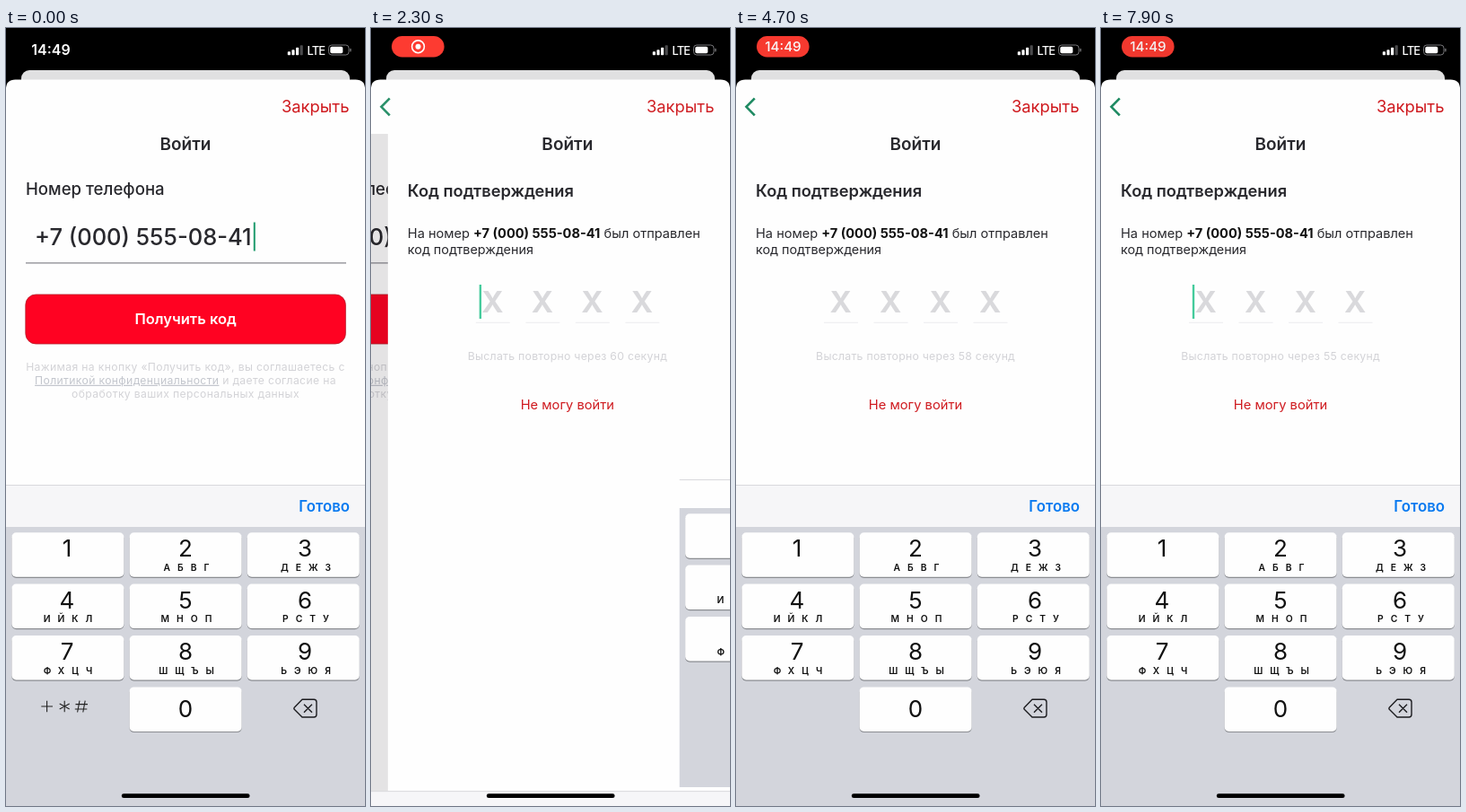
Recreate the animation shown at these times as an HTML page. Size 400 px wide and 867 px high, loop 8000 ms.

```html
<!DOCTYPE html>
<html lang="ru">
<head>
<meta charset="utf-8">
<title>Вход по коду</title>
<style>
  html, body { margin: 0; width: 100%; height: 100%; overflow: hidden; background: #000; }
  svg { display: block; width: 400px; height: 867px; font-family: Inter, "Open Sans", sans-serif; }
</style>
</head>
<body>
<svg id="stage" viewBox="0 0 400 867"></svg>
<script>
const LOOP = 8000;
const PHONE = '+7 (000) 555-08-41';
const RED = '#cf1a1f', INK = '#28282d', PALE = '#d3d3d7', PAPER = '#fefefe';

const rect = (x, y, w, h, fill, r = 0, extra = '') =>
  `<rect x="${x}" y="${y}" width="${w}" height="${h}" rx="${r}" fill="${fill}" ${extra}/>`;
const text = (s, x, y, size, fill, weight = 400, anchor = 'start', extra = '') =>
  `<text x="${x}" y="${y}" font-size="${size}" fill="${fill}" font-weight="${weight}" text-anchor="${anchor}" ${extra}>${s}</text>`;
const line = (d, color, width, extra = '') =>
  `<path d="${d}" fill="none" stroke="${color}" stroke-width="${width}" ${extra}/>`;
const group = (id, body) => `<g id="${id}">${body}</g>`;

function statusBar() {
  const bars = [4, 6, 8.5, 11].map((h, i) =>
    rect(313.8 + i * 4.6, 30.3 - h, 3.2, h, i < 3 ? '#fff' : '#4a4a4c', 0.8)).join('');
  const battery = rect(359.5, 19, 22.5, 11, 'none', 3.4, 'stroke="#77777a"') +
    rect(361.3, 20.8, 14, 7.4, '#fff', 1.8) + rect(383.2, 22.7, 1.4, 3.8, '#77777a', 0.7);
  const record = '<circle cx="52.5" cy="20.8" r="6.9" fill="none" stroke="#fff" stroke-width="1.6"/>' +
    '<circle cx="52.5" cy="20.8" r="3" fill="#fff"/>';
  return text('14:49', 50, 30, 16, '#fff', 600, 'middle', 'id="clock"') +
    group('pill', rect(23, 9, 58.6, 23.4, '#fd3b31', 11.7) + group('record', record) +
      text('14:49', 52.5, 26.2, 15.2, '#fff', 500, 'middle', 'id="pillClock"')) +
    bars + text('LTE', 335.5, 30, 13, '#fff', 500, 'start', 'letter-spacing="-.9"') + battery;
}

function phonePage() {
  const terms = (s, y) => text(s, 200, y, 12.2, PALE, 400, 'middle', 'letter-spacing=".35"');
  return rect(0, 118, 400, 749, PAPER) +
    text('Войти', 200, 135.5, 19, INK, 600, 'middle') +
    text('Номер телефона', 22, 186, 18.6, INK, 500) +
    text(PHONE, 32, 242.3, 25.5, INK, 500) +
    rect(22, 261.3, 357, 1.2, '#84848b') +
    rect(275.8, 216.5, 2, 32, '#1d9a6c', 0, 'id="phoneCaret"') +
    rect(21.8, 297, 356.6, 55, '#ff0222', 11.5, 'stroke="#b3202c" stroke-width=".8"') +
    text('Получить код', 200, 330.3, 16.5, '#fff', 600, 'middle') +
    terms('Нажимая на кнопку «Получить код», вы соглашаетесь с', 381.5) +
    terms('<tspan fill="#c3c6cd" text-decoration="underline">Политикой конфиденциальности</tspan> и даете согласие на', 396.8) +
    terms('обработку ваших персональных данных', 412) +
    rect(0, 118, 400, 749, '#0a0010', 0, 'id="dim"');
}

function codePage() {
  const cells = [0, 1, 2, 3].map(i =>
    text('X', 116.6 + i * 55.5, 317.3, 33, '#d9d9dc', 700, 'middle') +
    rect(98 + i * 55.5, 327.8, 38, 1, '#ececef')).join('');
  return rect(0, 118, 400, 749, PAPER) +
    text('Войти', 200, 135.5, 19, INK, 600, 'middle') +
    text('Код подтверждения', 22, 188, 18.3, INK, 600) +
    text(`На номер <tspan font-weight="700" fill="#111">${PHONE}</tspan> был отправлен`, 22, 234, 14.6, INK) +
    text('код подтверждения', 22, 251.6, 14.4, INK) + cells +
    rect(101.8, 286, 2.4, 38, '#45cb9c', 0, 'id="codeCaret"') +
    text('', 200, 370.3, 12.3, PALE, 400, 'middle', 'id="resend" letter-spacing=".25"') +
    text('Не могу войти', 200, 424.8, 14.7, RED, 400, 'middle');
}

function header() {
  return `<path d="M0 118V68Q0 57.5 10.5 57.5H389.5Q400 57.5 400 68V118Z" fill="${PAPER}"/>` +
    line('M20.8 78.3L11.5 87.8L20.8 97.3', '#1e8a62', 2.6, 'id="back"') +
    text('Закрыть', 382.5, 94.3, 18.4, RED, 400, 'end', 'id="close"');
}

const toolbar = id =>
  rect(0, 509, 400, 48, '#f6f6f8', 0, `id="${id}Bar"`) + rect(0, 509, 400, 1, '#d9d9dd') +
  text('Готово', 383, 539, 16.8, '#0a7af0', 600, 'end');

function keys(withSymbols) {
  const letters = ['', 'АБВГ', 'ДЕЖЗ', 'ИЙКЛ', 'МНОП', 'РСТУ', 'ФХЦЧ', 'ШЩЪЫ', 'ЬЭЮЯ'];
  const key = (x, y) => rect(x, y + 1.2, 125, 49.5, '#8b8d92', 5) + rect(x, y, 125, 49.5, PAPER, 5);
  const digit = (s, cx, y) => text(s, cx, y, 26, '#111', 400, 'middle');
  let out = rect(0, 556, 400, 311, '#d3d5dc');
  letters.forEach((s, i) => {
    const col = i % 3, x = 6.4 + col * 131.2, y = 562.2 + Math.floor(i / 3) * 57.4;
    const cx = [68, 200, 333][col];
    out += key(x, y) + digit(i + 1, cx, y + 27) +
      text(s, cx + 5, y + 42.7, 10.3, '#111', 600, 'middle', 'letter-spacing="8"');
  });
  out += key(137.6, 734.4) + digit('0', 200, 768);
  if (withSymbols) {
    out += line('M39.3 756H52M45.6 749.7V762.3M65.2 749.7V762.3M59.7 752.9L70.7 759.1M59.7 759.1L70.7 752.9' +
      'M77.5 753.6H91M76.8 759H90.3M82 749.7L79.6 762.5M88.2 749.7L85.8 762.5', '#222', 1.1);
  }
  return out + line('M330 748.3H343Q346 748.3 346 751.3V765Q346 768 343 768H330L321.5 759.5Q320.3 758.2 321.5 756.9Z' +
    'M332 753.7L341 762.7M341 753.7L332 762.7', '#1b1b1e', 1.4, 'stroke-linejoin="round"');
}

document.getElementById('stage').innerHTML =
  rect(0, 0, 400, 867, '#000') + statusBar() +
  rect(17, 47, 366, 30, '#e0e0e1', 9) + rect(0, 100, 400, 767, PAPER) +
  group('phone', phonePage()) + group('code', codePage()) + header() +
  group('oldPad', toolbar('old') + keys(true)) +
  group('newTools', toolbar('new')) + group('newKeys', keys(false)) +
  rect(128.8, 853.3, 142.8, 4.8, '#000', 2.4);

const el = {};
document.querySelectorAll('[id]').forEach(n => el[n.id] = n);

const clamp = v => Math.max(0, Math.min(1, v));
const ramp = (t, a, b) => clamp((t - a) / (b - a));
const move = (n, x, y = 0) => n.setAttribute('transform', `translate(${x.toFixed(2)} ${y.toFixed(2)})`);
const fade = (n, v) => n.setAttribute('opacity', v.toFixed(3));
const show = (n, on) => n.setAttribute('display', on ? 'inline' : 'none');

// Critically damped spring from 0 to 1
function spring(t, start) {
  const k = Math.max(0, t - start) * 0.016;
  return 1 - (1 + k) * Math.exp(-k);
}

function blink(ms) {
  const p = (ms / 1000) % 1;
  return p < 0.6 ? 1 - ramp(p, 0.35, 0.45) : ramp(p, 0.8, 0.9);
}

function render(t) {
  const push = spring(t, 2000);
  const slide = spring(t, 2260);
  const settled = t >= 2750;

  move(el.phone, -120 * push);
  move(el.code, 400 * (1 - push));
  fade(el.dim, 0.11 * push);
  fade(el.back, push);
  fade(el.close, 1 - 0.2 * Math.sin(Math.PI * push));

  move(el.oldPad, 0, 358 * push);
  show(el.oldPad, t < 2500);
  const dx = settled ? 0 : 400 * (1 - slide);
  move(el.newTools, dx, settled ? 0 : -6);
  move(el.newKeys, dx, settled ? 0 : -21);
  show(el.newTools, t > 2260);
  show(el.newKeys, t > 2260);
  el.newBar.setAttribute('fill', settled ? '#f6f6f8' : PAPER);

  fade(el.phoneCaret, blink(t + 350));
  fade(el.codeCaret, blink(t));
  const left = 60 - Math.max(0, Math.floor((t - 2600) / 1000));
  el.resend.textContent = `Выслать повторно через ${left} секунд`;

  const pulse = Math.pow(Math.cos(Math.PI * (t - 1100) / 2100), 4);
  const shown = ramp(t, 300, 600);
  fade(el.clock, 1 - shown);
  fade(el.pill, shown * (1 - 0.16 * pulse));
  const swap = ramp(t, 2900, 3150);
  fade(el.record, 1 - swap);
  fade(el.pillClock, swap);
}

const begin = performance.now();
function tick() {
  render((performance.now() - begin) % LOOP);
  requestAnimationFrame(tick);
}
tick();
</script>
</body>
</html>
```
